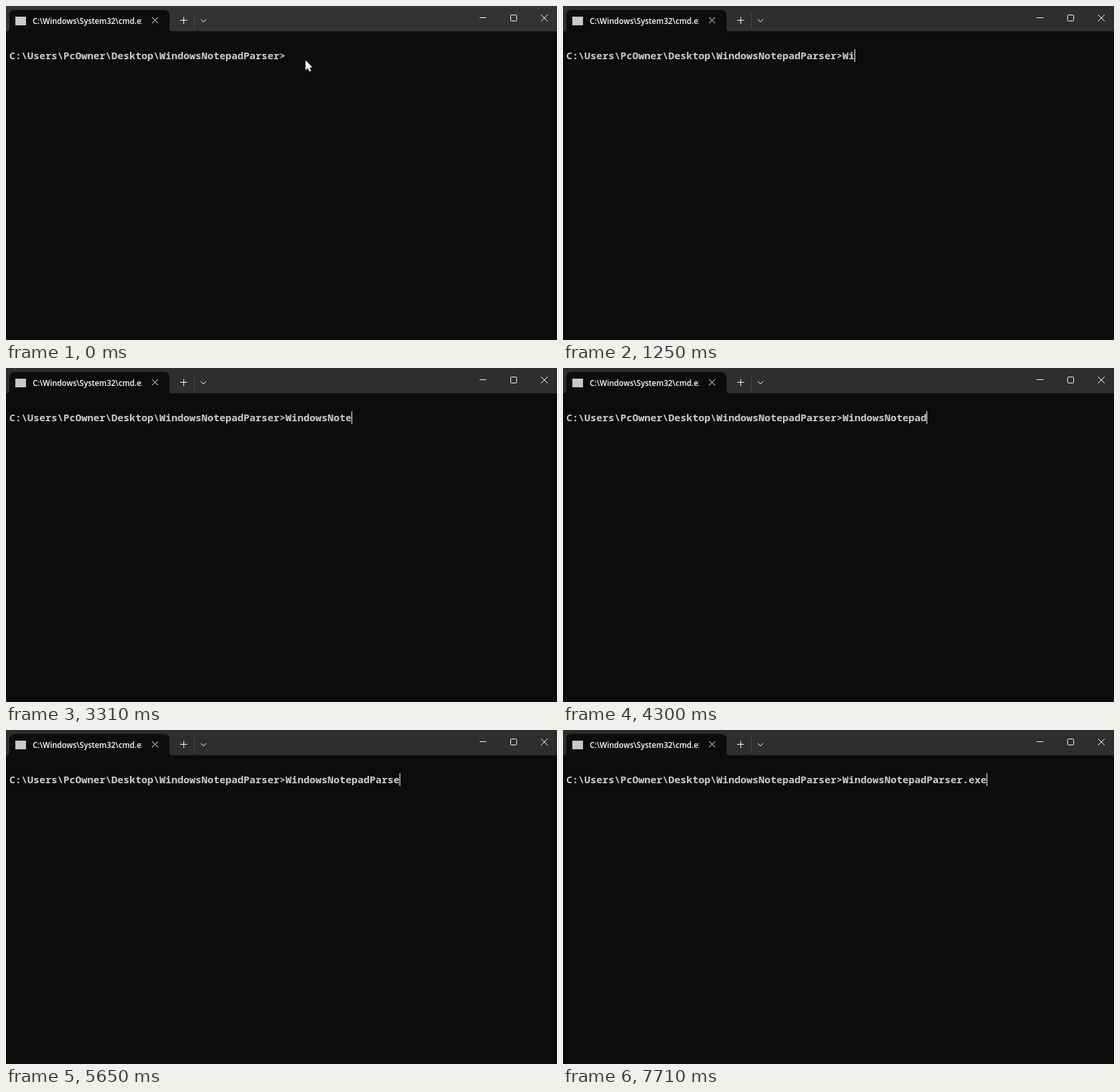
An HTML page for the animation above (7990 ms loop, 826 px wide and 502 px high).

```html
<!DOCTYPE html>
<html lang="en">
<head>
<meta charset="utf-8">
<title>Terminal</title>
<style>
  html, body { margin: 0; width: 100%; height: 100%; overflow: hidden; background: #0c0c0c; }
  svg { display: block; }
  .line { font: 600 15px "Noto Sans Mono", monospace; fill: #ccc; }
  .title { font: 600 11.6px "Open Sans", sans-serif; fill: #fff; }
  .icon { fill: none; stroke: #fff; stroke-width: 1; }
</style>
</head>
<body>
<svg width="826" height="502" viewBox="0 0 826 502">
  <clipPath id="titleClip"><rect x="40" y="8" width="163.5" height="28"/></clipPath>
  <rect width="826" height="502" fill="#0c0c0c"/>
  <rect id="bar" width="826" height="38"/>

  <!-- active tab -->
  <path fill="#0c0c0c" d="M1 38q4 0 4-4V14q0-8 8-8H237q8 0 8 8V34q0 4 4 4z"/>
  <rect x="14" y="16" width="16" height="13" fill="#c8c8c8"/>
  <text class="title" x="40" y="27" clip-path="url(#titleClip)">C:\Windows\System32\cmd.exe</text>

  <!-- tab and window buttons -->
  <path stroke="#484848" d="M282.5 10V35"/>
  <g class="icon">
    <path d="M219 17l9 9m0-9l-9 9"/>
    <path d="M261 21.5h10.500M266.500 16.500v10.500"/>
    <path d="M292 20l4 4 4-4"/>
    <path d="M710 17.500h10"/>
    <rect x="756.5" y="13.5" width="9" height="9" rx="1"/>
    <path d="M802 13l10 10m0-10l-10 10"/>
  </g>

  <text class="line" x="5" y="80">C:\Users\PcOwner\Desktop\WindowsNotepadParser&gt;</text>
  <text class="line" id="typed" x="419" y="80"></text>
  <rect id="caret" y="65" width="1" height="19" fill="#fff"/>
  <path id="pointer" fill="#fff" d="M449 81.500v15l3.400-3.200 2.500 5.200 2.500-1.100-2.400-5.100h4.500z"/>
</svg>
<script>
const LOOP = 7990, CELL = 9, INPUT_X = 419, BACKSPACE = "\b";
const FOCUS = 250, CARET_START = 320, POINTER_HIDE = 920;
const caretOff = [[850, 990], [7180, 7710]];

// Key presses, including one corrected slip
const keys = "WindowsNoteo" + BACKSPACE + "padParser.exe";
const times = [
  990, 1250, 1370, 1530, 1720, 2190, 2380,
  2940, 3130, 3220, 3310, 3530, 4000, 4100, 4200, 4300,
  4520, 4710, 4870, 5180, 5650, 5770, 5930, 6120, 6340, 6590
];

const el = id => document.getElementById(id);
const bar = el("bar"), typed = el("typed"), caret = el("caret"), pointer = el("pointer");
const show = (node, visible) => node.setAttribute("visibility", visible ? "visible" : "hidden");

function textAt(t) {
  let text = "";
  times.forEach((time, i) => {
    if (time <= t) text = keys[i] === BACKSPACE ? text.slice(0, -1) : text + keys[i];
  });
  return text;
}

function draw() {
  const t = performance.now() % LOOP;
  const text = textAt(t);
  bar.setAttribute("fill", t < FOCUS ? "#333333" : "#2e2e2e");
  typed.textContent = text;
  caret.setAttribute("x", INPUT_X + CELL * text.length);
  show(caret, t >= CARET_START && !caretOff.some(([from, to]) => t >= from && t < to));
  show(pointer, t < POINTER_HIDE);
  requestAnimationFrame(draw);
}
draw();
</script>
</body>
</html>
```
